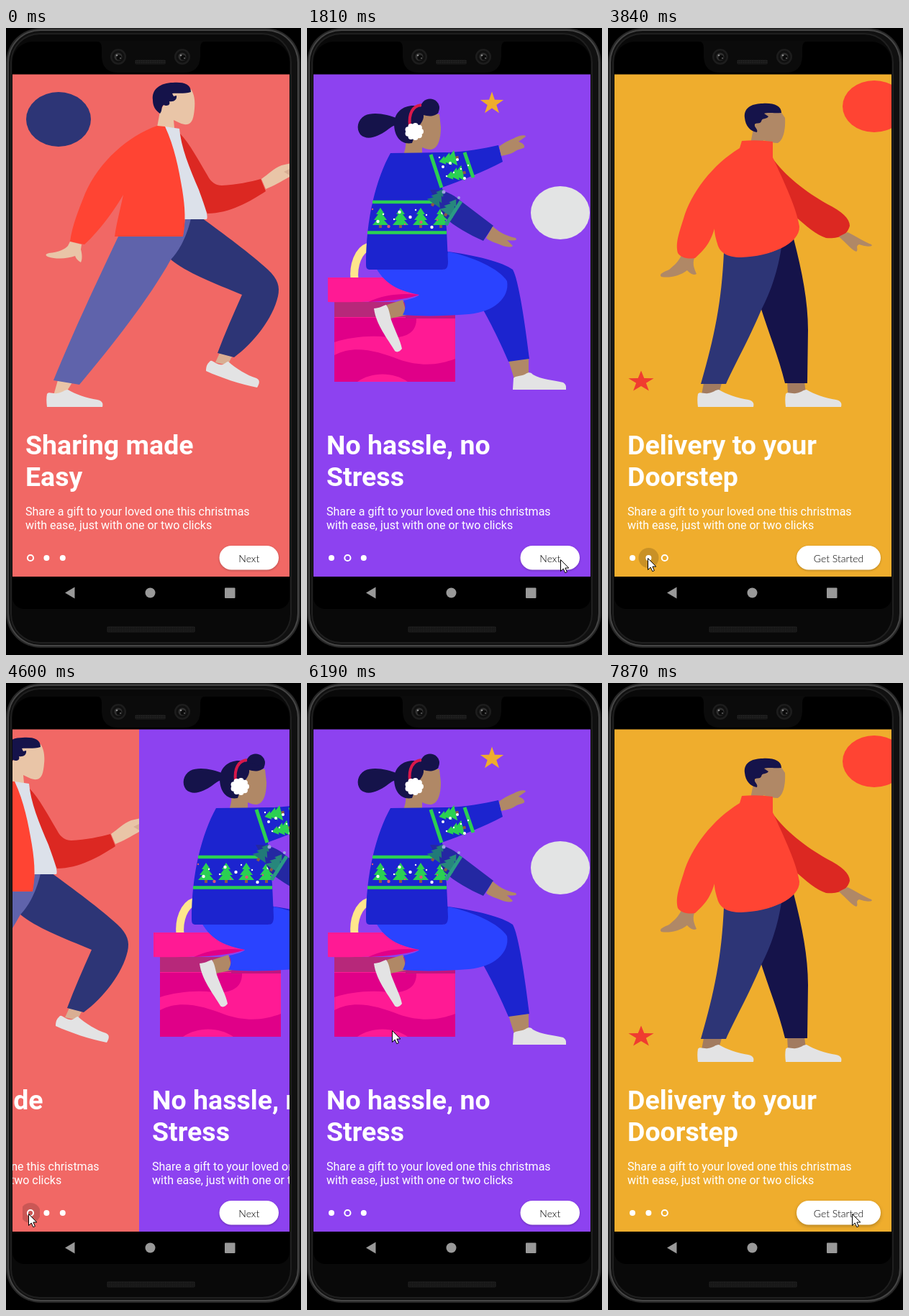
Write an HTML page with a canvas that moves like this. It is 410 by 872 pixels and loops after 8000 ms.

```html
<!DOCTYPE html>
<html lang="en">
<head>
<meta charset="utf-8">
<title>Onboarding</title>
<style>
html, body { margin: 0; width: 100%; height: 100%; overflow: hidden; background: #000; }
canvas { display: block; width: 410px; height: 872px; }
</style>
</head>
<body>
<canvas id="stage" width="410" height="872"></canvas>
<script>
const ctx = document.getElementById('stage').getContext('2d');
const LOOP = 8000, TICK = 10, LEFT = 9, TOP = 64.5, W = 385, H = 698.5;
const NAVY = '#2d3576', INK = '#15134a', RED = '#ff4433', CRIMSON = '#dc2822';
const PALE = '#e9c5a7', TAN = '#b08866', SHOE = '#e3e3e4', BLUE = '#1c24cf', GREEN = '#2bd052';
const PINK = '#ff1a94', MAGENTA = '#e00088', GOLD = '#efad2d';

// ---- drawing helpers ----
const cache = {};
const path = d => cache[d] || (cache[d] = new Path2D(d));
function fill(color, d) { ctx.fillStyle = color; ctx.fill(path(d)); }
function line(color, width, d) {
  ctx.strokeStyle = color;
  ctx.lineWidth = width;
  ctx.stroke(path(d));
}
function oval(color, x, y, rx, ry = rx) {
  ctx.fillStyle = color;
  ctx.beginPath();
  ctx.ellipse(x, y, rx, ry, 0, 0, 7);
  ctx.fill();
}
function box(color, x, y, w, h, r = 0) {
  ctx.fillStyle = color;
  ctx.beginPath();
  ctx.roundRect(x, y, w, h, r);
  ctx.fill();
}
function at(x, y, angle, draw) {
  ctx.save();
  ctx.translate(x, y);
  ctx.rotate(angle);
  draw();
  ctx.restore();
}
function star(color, x, y, rx, ry) {
  ctx.fillStyle = color;
  ctx.beginPath();
  for (let i = 0; i < 10; i++) {
    const a = i * Math.PI / 5 - Math.PI / 2, k = i % 2 ? 0.39 : 1;
    ctx.lineTo(x + Math.cos(a) * rx * k, y + Math.sin(a) * ry * k);
  }
  ctx.fill();
}
function text(str, x, y, font, color) {
  ctx.font = font;
  ctx.fillStyle = color;
  ctx.fillText(str, x, y);
}
function shoe(x) {
  at(x, 0, 0, () => fill(SHOE, 'M125 509C127 505 133 509 139 508C147 507 149 503 154 503C164 509 180 515 195 517C203 519 203 523 202 527H125C124 520 124 514 125 509Z'));
}
function tree(x, y, angle = 0, color = GREEN) {
  at(x, y, angle, () => {
    box('#8a5a44', -2, 9, 4, 6);
    fill(color, 'M0-13L6-4H3L9 4H5L11 11H-11L-5 4H-9L-3-4H-6Z');
  });
}

// ---- illustrations ----
function runner() {
  oval(NAVY, 73, 127, 45, 38);
  fill(PALE, 'M230 88L257 85C262 92 263 103 262 112C261 124 259 133 252 134C246 135 239 131 233 128L234 139L210 138L214 116Z');
  fill(INK, 'M204 100C202 85 215 76 232 76C245 75 257 77 257 89C247 92 236 90 231 91L233 95L237 94C238 100 233 103 227 102C229 108 223 109 219 107C215 110 218 114 214 119C207 114 204 108 204 100Z');
  fill(PALE, 'M72 490L92 493L84 506L66 511Z');
  shoe(-68);
  fill('#d9ae93', 'M297 452L314 457L308 469L291 465Z');
  fill(SHOE, 'M283 464C286 460 290 467 297 468C303 470 306 463 309 464C320 474 335 483 348 487C354 490 352 495 349 500C325 495 300 487 278 477C278 470 280 467 283 464Z');
  fill(NAVY, 'M254 264H272C302 286 340 314 364 336C378 349 381 360 378 373C371 404 344 438 317 458L294 452C304 425 316 398 328 371C290 355 250 340 229 322C240 305 249 285 254 264Z');
  fill('#5f63ab', 'M157 288H246L249 265H257C250 295 238 313 229 322C200 375 145 445 102 496L66 490C97 415 123 360 157 288Z');
  fill(CRIMSON, 'M242 147C255 160 268 185 280 205C285 215 292 219 300 219C320 218 340 214 354 210L361 227C340 241 310 258 280 258C266 230 246 195 242 147Z');
  fill('#dce1ea', 'M221 137L241 140C243 165 255 195 268 225C275 245 282 262 279 266H248C248 230 235 180 221 137Z');
  fill(RED, 'M210 136C170 150 130 185 110 230C100 255 92 275 89 297L109 301C122 290 147 260 163 232C158 255 153 275 151 290H246C250 270 249 250 245 225C240 195 234 165 221 137Z');
  fill(PALE, 'M355 210C365 203 372 195 383 191L396 188V206C385 212 372 220 361 224Z');
  fill('#d9ae93', 'M386 200L396 195V206Z');
  fill(PALE, 'M89 297L105 301L104 308C106 315 106 322 104 326C99 323 97 320 96 317C85 321 70 322 58 318C54 316 55 314 60 313C72 312 82 308 86 303Z');
}
function sitter() {
  star(GOLD, 257, 105, 17, 16.5);
  oval('#e3e4e4', 352, 257, 41, 37);
  line('#ffe68c', 11, 'M86 304C71 309 64 330 66 350');
  box(PINK, 38, 400, 168, 92);
  fill(MAGENTA, 'M38 403H152C153 424 137 432 112 430C88 427 60 430 38 437Z');
  fill(MAGENTA, 'M38 455C65 440 98 449 128 461C160 472 185 468 206 460V492H140C120 478 90 478 70 492H38Z');
  fill('#b7287a', 'M38 381H140V402H38Z');
  box('#c01680', 137, 399, 69, 5);
  fill(PINK, 'M29 347H110L156 371C125 380 80 382 29 381Z');
  fill(MAGENTA, 'M85 381C105 371 130 368 156 371C135 378 110 380 85 381Z');

  // legs
  fill(TAN, 'M280 462L308 459L308 484L288 488Z');
  fill(SHOE, 'M287 487C290 483 298 485 304 481C308 478 312 479 314 482C325 489 345 490 356 493C361 496 360 500 360 503H286Z');
  fill(BLUE, 'M190 310C235 316 273 326 286 336C294 350 303 410 309 460L280 464C268 435 250 400 238 380Z');
  fill(TAN, 'M111 385L133 378L139 399L116 404Z');
  fill('#2a43ff', 'M96 334L190 336L196 311C230 318 268 335 278 352C282 375 260 395 225 398C190 401 155 401 133 399C138 390 137 384 134 379C148 376 155 373 156 371C130 366 110 358 96 334Z');
  fill(SHOE, 'M93 390C100 390 106 386 110 385C114 390 115 398 117 406C122 420 130 435 132 446C129 450 125 452 122 449C112 432 96 413 93 390Z');

  // head
  fill(INK, 'M126 126C112 120 92 116 80 122C70 128 68 140 74 148C84 158 100 150 110 143C116 138 121 135 126 134Z');
  oval(INK, 171, 111, 13, 12.5);
  fill(TAN, 'M140 116L184 120L186 138C186 155 182 168 172 169C167 169 163 167 160 166V176H134C138 165 138 160 136 150Z');
  fill(INK, 'M121 133C122 114 138 105 156 109L183 117C178 124 168 123 162 121C163 130 155 135 153 141L146 160C130 163 121 150 121 133Z');
  line('#d9184b', 4, 'M159 107C147 108 141 119 143 136');
  for (let i = 0; i < 9; i++) {
    const a = i * Math.PI * 2 / 9;
    oval('#fff', 149 + Math.cos(a) * 9, 144 + Math.sin(a) * 8, 4);
  }
  oval('#fff', 149, 144, 10);

  // sweater
  fill(BLUE, 'M116 174L196 173L188 222L194 280L196 325C196 333 194 336 188 336H88C83 336 82 334 82 328C82 265 96 210 116 174Z');
  line(GREEN, 4.5, 'M91 242H190M84 284.5H194');
  for (let i = 0; i < 4; i++) tree(102 + i * 28, 263);
  for (let i = 0; i < 14; i++) {
    const x = 91 + i * 7.5;
    oval(i % 3 ? '#fff' : '#d95878', x, 252 + (i * 17) % 27, i % 2 ? 2.2 : 1.2);
  }
  fill('#2428a2', 'M171 225C188 224 202 230 213 240L259 275L245 296C225 287 205 276 191 263Z');
  tree(182, 235, 0.6, '#217a78');
  tree(200, 249, 0.6, '#27877c');
  line('#2b9b84', 5, 'M214 241L193 274');
  oval('#9aa5df', 190, 228, 2.5);
  oval('#9aa5df', 211, 236, 2);
  fill(TAN, 'M258 276C265 282 275 289 290 292C294 296 285 296 278 295L286 303C283 306 275 304 270 302C260 298 253 296 249 292Z');
  fill(BLUE, 'M168 174L196 173C220 172 245 168 266 163L272 186C245 200 215 212 187 222Z');
  tree(196, 183, -1.8);
  tree(206, 204, -1.8);
  line(GREEN, 5, 'M172 176L187 222M219 173L231 208');
  for (let i = 0; i < 9; i++) oval('#fff', 184 + i * 5, 180 + (i * 13) % 31, i % 2 ? 2 : 1.2);
  fill(TAN, 'M267 165C275 158 285 155 290 152C296 149 304 148 304 151L294 158C300 160 303 163 302 166C300 168 295 168 290 171C285 175 278 176 270 178Z');
}
function walker() {
  oval(RED, 370, 109, 44, 36);
  star('#f03c30', 46, 492, 18.5, 15.5);
  fill(TAN, 'M212 119L240 116L246 125C247 140 244 156 236 160C230 160 222 158 216 156V161H198L202 140Z');
  fill(INK, 'M190 125C188 109 203 105 215 105C230 104 241 108 241 118C230 119 222 117 217 119L223 123C220 128 214 124 213 130C211 134 206 131 204 134C203 139 209 140 207 145C198 144 191 136 190 125Z');
  fill(CRIMSON, 'M228 180C245 205 275 228 305 245C325 255 336 265 336 275C332 290 320 293 303 292C290 288 275 275 260 262Z');
  fill(TAN, 'M321 290L333 284C345 290 358 298 366 301C370 305 357 304 349 301C343 303 349 309 345 311C338 308 332 300 326 295Z');
  fill('#a27b60', 'M133 494H158L154 508L130 510Z');
  fill('#a27b60', 'M249 492H273L275 508L250 509Z');
  shoe(0);
  shoe(122);
  fill(INK, 'M238 305L258 293C270 340 278 380 278 420L277 494H246C238 460 222 420 212 388Z');
  fill(NAVY, 'M161 312C200 322 230 312 241 305C235 345 222 375 213 392C195 435 175 470 164 495H129C148 430 158 380 161 312Z');
  fill(TAN, 'M102 316L120 320C117 328 120 335 123 342C118 345 113 340 110 337C100 345 85 348 74 346C70 342 78 339 85 336C92 330 98 325 102 316Z');
  fill(RED, 'M186 157Q208 155 229 158V180C245 215 262 250 266 276C267 300 225 318 185 319C165 319 155 312 152 300C149 290 148 285 148 279C143 295 138 305 121 320C110 322 101 319 97 313C94 300 97 290 105 265C115 230 145 190 183 167Z');
}

const pages = [
  { color: '#f16865', title: ['Sharing made', 'Easy'], art: runner },
  { color: '#8d42f0', title: ['No hassle, no', 'Stress'], art: sitter },
  { color: GOLD, title: ['Delivery to your', 'Doorstep'], art: walker }
];
const note = ['Share a gift to your loved one this christmas', 'with ease, just with one or two clicks'];

// ---- motion ----
const pointer = [
  [320, 351, 874], [600, 350, 800], [870, 352, 739], [2870, 352, 739], [3050, 300, 715],
  [3250, 200, 690], [3450, 110, 700], [3630, 57, 737], [3700, 55, 737], [4240, 55, 737],
  [4390, 31, 738], [4790, 31, 738], [5000, 110, 720], [5300, 270, 690], [5690, 287, 680],
  [5780, 223, 617], [5850, 150, 502], [5890, 115, 478], [6120, 90, 470], [6500, 240, 540],
  [6680, 269, 535], [6800, 87, 504], [6830, 60, 500], [7080, 70, 520], [7500, 280, 700],
  [7780, 339, 738]
];
const slides = [[1490, 1800, 0, 1], [2410, 2730, 1, 2], [3870, 4180, 2, 1], [4454, 4764, 1, 0]];
const drags = [
  { press: 5690, release: 5890, end: 6150, from: 0 },
  { press: 6680, release: 6830, end: 7080, from: 1 }
];
const unit = v => Math.max(0, Math.min(1, v));
const smooth = v => v * v * (3 - 2 * v);

function pointerAt(t) {
  const i = pointer.findIndex(k => k[0] > t);
  if (i === 0) return [0, 900];
  if (i < 0) return pointer[pointer.length - 1].slice(1);
  const a = pointer[i - 1], b = pointer[i], k = (t - a[0]) / (b[0] - a[0]);
  return [a[1] + (b[1] - a[1]) * k, a[2] + (b[2] - a[2]) * k];
}
function viewAt(t) {
  let scroll = 0, active = 0;
  for (const [start, end, from, to] of slides) {
    if (t < start) break;
    scroll = from + (to - from) * smooth(unit((t - start) / (end - start)));
    active = to;
  }
  for (const d of drags) {
    if (t < d.press) break;
    const held = Math.min(t, d.release);
    const pulled = (pointerAt(d.press)[0] - pointerAt(held)[0]) / W;
    const settle = 1 - (1 - unit((t - d.release) / (d.end - d.release))) ** 2.5;
    scroll = d.from + pulled + (1 - pulled) * settle;
    active = Math.round(scroll);
  }
  return { scroll, active };
}

// ---- scene ----
function phone() {
  box('#000', 0, 0, 410, 872);
  box('#262626', 0, 0, 409, 862, 48);
  box('#454545', 2, 2, 405, 858, 46);
  box('#101010', 4, 4, 401, 854, 44);
  box('#1f1f1f', 6, 7, 391, 849, 41);
  box('#090909', 8, 9, 387, 845, 39);
  box('#000', LEFT, 19, W, 789, [28, 28, 16, 16]);
  fill('#0b0b0b', 'M126 18Q133 19 133 28V40Q134 62 156 62H247Q269 62 270 40V28Q270 19 277 18Z');
  for (const x of [156, 245]) {
    oval('#1d1d1d', x, 40, 11);
    oval('#101010', x, 40, 8.5);
    oval('#303030', x, 40, 5.5);
    oval('#0a0a0a', x + 1, 41, 3.5);
    oval('#8a8a8a', x - 2, 38, 1.3);
    oval('#606060', x + 3, 42, 1.1);
  }
  mesh(179, 44, 43, 7, '#2d2d2d');
  mesh(140, 832, 123, 9, '#252525');
  fill('#999', 'M82 785.5L95.5 777.5V793.5Z');
  oval('#999', 200.5, 785.5, 7);
  box('#999', 304, 778.5, 14.5, 14.5, 1);
}
function mesh(x, y, w, h, color) {
  box('#151515', x, y, w, h, 3);
  ctx.fillStyle = color;
  for (let i = 1; i < w - 1; i += 2.5) {
    for (let j = 1; j < h - 1; j += 2.5) ctx.fillRect(x + i, y + j, 1.3, 1.3);
  }
}
function page(i, scroll) {
  // Whole pixels keep the seam between pages clean.
  const shift = Math.round((i - scroll) * W);
  if (Math.abs(shift) >= W) return;
  const p = pages[i];
  ctx.save();
  ctx.translate(shift, 0);
  ctx.beginPath();
  ctx.rect(LEFT, 0, W, 872);
  ctx.clip();
  box(p.color, LEFT, 0, W, 872);
  p.art();
  p.title.forEach((s, n) => text(s, 27, 593 + n * 44, '700 37.5px Roboto, sans-serif', '#fff'));
  note.forEach((s, n) => text(s, 27, 678 + n * 19, '400 16px Roboto, sans-serif', '#fff'));
  ctx.restore();
}
function splash(t, start, x, fade, cell) {
  const age = t - start;
  if (age < 0 || age > fade) return;
  ctx.save();
  if (cell) {
    ctx.beginPath();
    ctx.rect(23, 723, 24, 28);
    ctx.clip();
  }
  const alpha = 0.16 * unit((fade - age) / (fade - 230));
  oval(`rgba(0,0,0,${alpha})`, x, 737, 5 + 9 * unit(age / 130));
  ctx.restore();
}
function controls(t, active) {
  splash(t, 3690, 56.5, 450);
  splash(t, 4390, 34, 500, true);
  for (let i = 0; i < 3; i++) {
    const x = 34 + i * 22.4;
    if (i !== active) { oval('#fff', x, 737, 4); continue; }
    ctx.strokeStyle = '#fff';
    ctx.lineWidth = 2;
    ctx.beginPath();
    ctx.arc(x, 737, 4.1, 0, 7);
    ctx.stroke();
  }
  const last = active === 2, x = last ? 262 : 296.5;
  ctx.save();
  ctx.shadowColor = 'rgba(0,0,0,.25)';
  ctx.shadowBlur = t >= 7870 ? 5 : 3;
  ctx.shadowOffsetY = t >= 7870 ? 2 : 1;
  box('#fff', x, 720, 379 - x, 33.5, 17);
  ctx.restore();
  if (t >= 1140 && t < 1210) oval('rgba(0,0,0,.08)', 352, 739, 15);
  ctx.textAlign = 'center';
  text(last ? 'Get Started' : 'Next', (x + 379) / 2, 743, '300 14px Lato, sans-serif', '#000');
  ctx.textAlign = 'left';
}
function arrow([x, y]) {
  at(Math.round(x), Math.round(y), 0, () => {
    const d = 'M.5 .5V16.5L4.2 13L6.8 18.7L9.4 17.5L6.9 12H11.8Z';
    fill('#fff', d);
    line('#000', 1, d);
  });
}
function frame() {
  const t = Math.floor(performance.now() % LOOP / TICK) * TICK;
  const { scroll, active } = viewAt(t);
  phone();
  ctx.save();
  ctx.beginPath();
  ctx.rect(LEFT, TOP, W, H);
  ctx.clip();
  pages.forEach((_, i) => page(i, scroll));
  controls(t, active);
  ctx.restore();
  arrow(pointerAt(t));
  requestAnimationFrame(frame);
}
frame();
</script>
</body>
</html>
```
